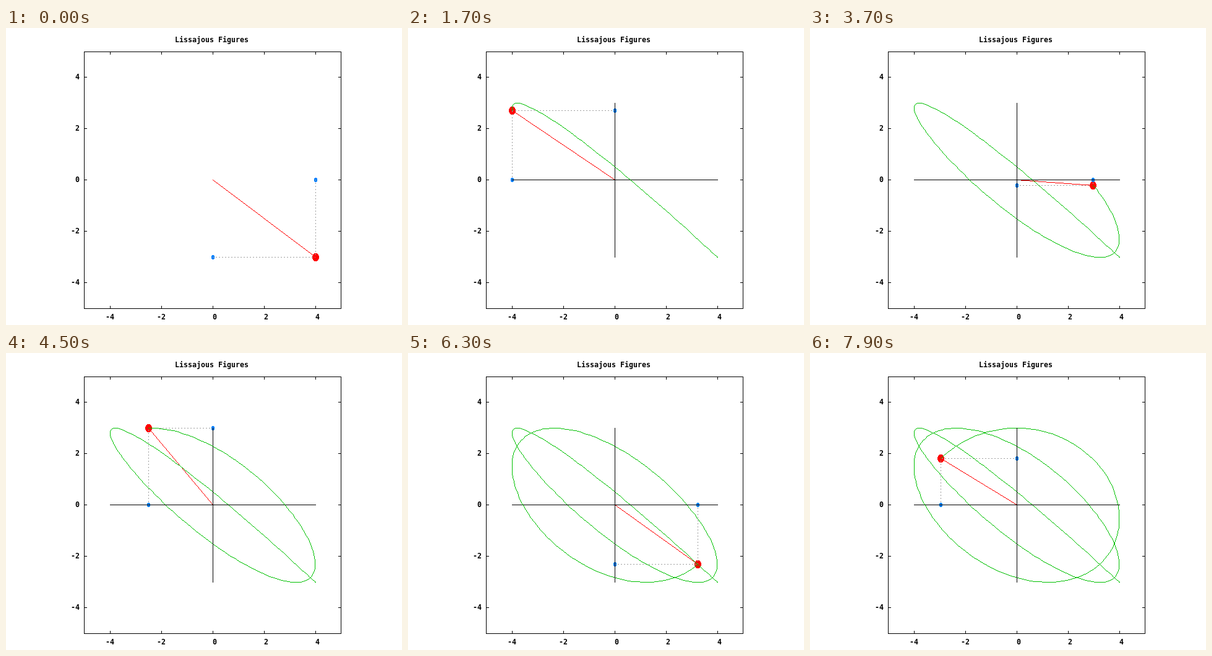
An HTML page with a canvas that plays this animation: 640 by 480 pixels, repeating every 8000 ms.

```html
<!DOCTYPE html>
<html lang="en">
<head>
<meta charset="utf-8">
<title>Lissajous Figures</title>
<style>
  html, body { margin: 0; width: 640px; height: 480px; overflow: hidden; background: #fff; }
  canvas, svg { position: absolute; left: 0; top: 0; display: block; }
  text { font: bold 11.63px "DejaVu Sans Mono", "Liberation Mono", monospace; fill: #000; white-space: pre; }
</style>
</head>
<body>
<canvas id="plot" width="640" height="480"></canvas>
<svg id="labels" width="640" height="480">
  <text x="273" y="23">Lissajous Figures</text>
</svg>
<script>
const ctx = document.getElementById('plot').getContext('2d');
const labels = document.getElementById('labels');

const LOOP = 8000, STEP = 100, UNIT = 41.5, SUB = 4;
const BOX = { left: 126, right: 541, top: 38, bottom: 453 };
const TICKS = [-4, -2, 0, 2, 4];
const RATE = 2 / 95;

const px = x => Math.floor(334 + UNIT * x);
const py = y => Math.ceil(245 - UNIT * y);
const posX = k => px(4 * Math.cos(9 * RATE * k));
const posY = k => py(-3 * Math.cos(10 * RATE * k));
const OX = px(0), OY = py(0);

function addLabel(x, y, value) {
  const t = document.createElementNS('http://www.w3.org/2000/svg', 'text');
  t.setAttribute('x', x);
  t.setAttribute('y', y);
  t.textContent = String(value);
  labels.append(t);
}

for (const v of TICKS) {
  addLabel(px(v) - (v < 0 ? 7 : 0), 471, v);
  addLabel(v < 0 ? 105 : 112, py(v) + 4, v);
}

// One-pixel line without smoothing; dashes are 2 on, 3 off.
function line(x0, y0, x1, y1, color, dashed) {
  ctx.fillStyle = color;
  const n = Math.max(Math.abs(x1 - x0), Math.abs(y1 - y0));
  for (let i = 0; i <= n; i++) {
    if (dashed && i % 5 > 1) continue;
    const f = n ? i / n : 0;
    ctx.fillRect(Math.round(x0 + (x1 - x0) * f), Math.round(y0 + (y1 - y0) * f), 1, 1);
  }
}

function dot(x, y, rx, ry, color) {
  ctx.fillStyle = color;
  for (let dy = -ry; dy <= ry; dy++) {
    const w = Math.floor((rx + 0.5) * Math.sqrt(1 - (dy / (ry + 0.5)) ** 2));
    ctx.fillRect(x - w, y + dy, 2 * w + 1, 1);
  }
}

function drawFrame() {
  const { left, right, top, bottom } = BOX;
  line(left, top, right, top, '#000');
  line(left, bottom, right, bottom, '#000');
  line(left, top, left, bottom, '#000');
  line(right, top, right, bottom, '#000');
  for (const v of TICKS) {
    const x = px(v), y = py(v);
    line(x, top, x, top + 4, '#000');
    line(x, bottom - 4, x, bottom, '#000');
    line(left, y, left + 4, y, '#000');
    line(right - 4, y, right, y, '#000');
  }
}

function drawTrace(k) {
  let x0 = posX(0), y0 = posY(0);
  for (let i = 1; i <= k * SUB; i++) {
    const x = posX(i / SUB), y = posY(i / SUB);
    line(x0, OY, x, OY, '#000');
    line(OX, y0, OX, y, '#000');
    line(x0, y0, x, y, '#00c000');
    x0 = x;
    y0 = y;
  }
}

function draw(k) {
  const x = posX(k), y = posY(k);
  ctx.clearRect(0, 0, 640, 480);
  drawFrame();
  dot(x, y, 5, 6, '#f00');
  dot(x, OY, 2, 3, '#0080ff');
  dot(OX, y, 2, 3, '#0080ff');
  line(x, OY, x, y, '#a0a0a0', true);
  line(OX, y, x, y, '#a0a0a0', true);
  line(OX, OY, x, y, '#f00');
  drawTrace(k);
}

let shown = -1;
function tick() {
  const k = Math.floor(performance.now() % LOOP / STEP);
  if (k !== shown) draw(shown = k);
  requestAnimationFrame(tick);
}
tick();
</script>
</body>
</html>
```
